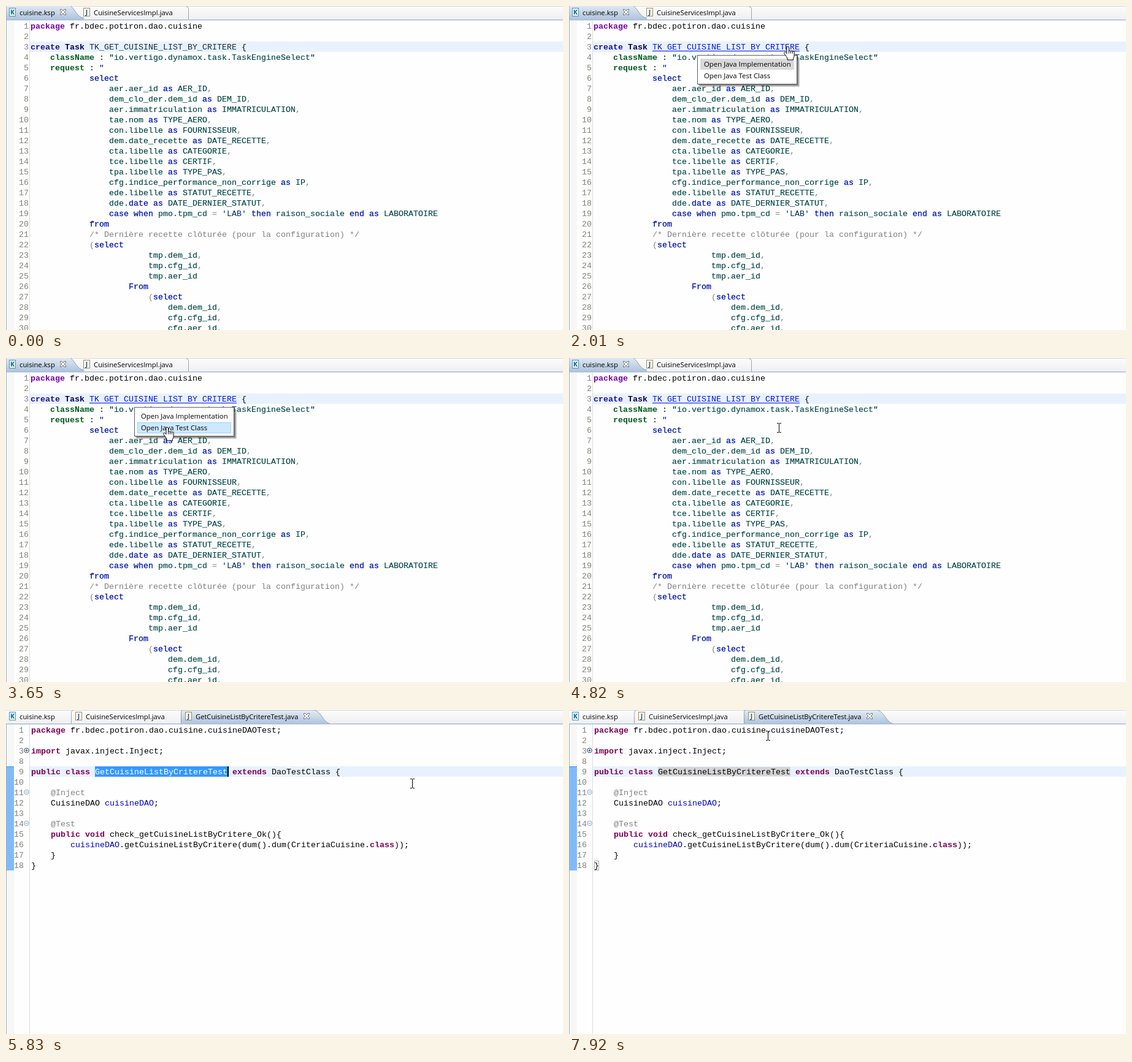
These frames come from a looping animation (908x529 px, 7.99 s). An HTML page:

```html
<!DOCTYPE html>
<html lang="fr">
<head>
<meta charset="utf-8">
<title>Editor</title>
<style>
html, body { margin: 0; width: 100%; height: 100%; overflow: hidden; background: #fff; }
svg { display: block; width: 908px; height: 529px; }
text { white-space: pre; }
.code text { font: 13.333px "Liberation Mono", "Courier New", monospace; }
.ui { font: 11.3px "Open Sans", "Noto Sans", sans-serif; fill: #000; }
.num { fill: #85827a; text-anchor: end; }
.kw { fill: #7f0055; font-weight: bold; }
.pkg { fill: #7a00a8; font-weight: bold; }
.make { fill: #1a0f9c; font-weight: bold; }
.def { fill: #00005f; font-weight: bold; }
.prop { fill: #005a1e; font-weight: bold; }
.sql { fill: #0016b0; stroke: #0016b0; stroke-width: .3px; }
.id { fill: #004444; stroke: #004444; stroke-width: .15px; }
.str { fill: #002a5c; }
.dim { fill: #808080; }
.field { fill: #0000c0; }
.link { fill: #0018d8; }
.sel { fill: #fff; }
.name { fill: #10303c; }
</style>
</head>
<body>
<svg viewBox="0 0 908 529" xmlns="http://www.w3.org/2000/svg">
  <defs>
    <linearGradient id="bar" x2="0" y2="1"><stop stop-color="#fcfcfc"/><stop offset="1" stop-color="#efefef"/></linearGradient>
    <linearGradient id="tab" x2="0" y2="1"><stop stop-color="#e6edf5"/><stop offset="1" stop-color="#adc2db"/></linearGradient>
    <pattern id="hatch" width="2" height="2" patternUnits="userSpaceOnUse">
      <rect width="2" height="2" fill="#b8d8fa"/><path d="M0 0h1v1H0zM1 1h1v1H1z" fill="#4a9cf5"/>
    </pattern>
    <g id="close"><path d="M-4.5-4.5h2.2L0-2 2.3-4.5h2.2v2L2 0l2.5 2.5v2H2.3L0 2l-2.3 2.5h-2.2v-2L-2 0l-2.5-2.5z" fill="#fff" stroke="#62686f"/></g>
    <g id="ibeam" shape-rendering="crispEdges"><path d="M-3-8h3v1h1v-1h3v1H1v14h3v1H1v-1H0v1h-3v-1h3V-7h-3z"/></g>
    <g id="hand" stroke="#000" stroke-linejoin="round">
      <path d="M.5.5C-.6.5-1 1.2-1 2v9.5l-1.7-1.7c-1.4-1.2-3.3 0-2.5 1.7l3.7 5.2 1.5 2.8v2.5h9.5v-2.5c1.3-2 1.7-3.5 1.7-6.5V9.2c0-1.8-2.3-2-2.8-.7-.3-1.6-2.5-1.7-2.9-.6-.5-1.4-2.4-1.4-2.9-.4V2C2.6 1.2 1.8.5.5.5z" fill="#fff"/>
      <path d="M2.6 7v4.5M5.5 8v3.5M8.4 8.5v3" fill="none"/>
    </g>
  </defs>
  <rect width="908" height="529" fill="#fefefe"/>
  <g id="ksp"></g>
  <g id="java"></g>
  <g id="menu"></g>
  <use id="beamCur" href="#ibeam"/>
  <use id="handCur" href="#hand"/>
</svg>
<script>
const LOOP = 7990;
const $ = id => document.getElementById(id);
const esc = s => s.replace(/&/g, "&amp;").replace(/</g, "&lt;");
const span = (cls, s) => `<tspan class="${cls}">${esc(s)}</tspan>`;
const rect = (x, y, w, h, fill, more = "") => `<rect x="${x}" y="${y}" width="${w}" height="${h}" fill="${fill}" ${more}/>`;
const path = (d, more) => `<path d="${d}" ${more}/>`;
const label = (x, y, s, size = 11.3) => `<text class="ui" x="${x}" y="${y}" style="font-size:${size}px">${s}</text>`;
const row = i => 37 + 17 * i;

// Wraps every match of the rules [class, pattern] in a coloured span
function paint(s, rules, rest) {
  const re = new RegExp(rules.map(r => `(${r[1]})`).join("|"), "g");
  let out = "", at = 0;
  for (const m of s.matchAll(re)) {
    if (m.index > at) out += span(rest, s.slice(at, m.index));
    out += span(rules[m.slice(1).findIndex(g => g !== undefined)][0], m[0]);
    at = m.index + m[0].length;
  }
  return out + (at < s.length ? span(rest, s.slice(at)) : "");
}

function icon(x, letter) {
  const k = letter === "K";
  return rect(x + .5, 3.5, 10, 13, k ? "#f2fafd" : "#fffdf2", `stroke="${k ? "#4f8fb0" : "#a08a50"}"`) +
    `<text x="${x + 5.5}" y="14" text-anchor="middle" style="font:bold 10.5px 'Open Sans',sans-serif" fill="${k ? "#00698c" : "#22559c"}">${letter}</text>`;
}

// Tab strip with the active tab from x0 whose curve starts at x1
function strip(x0, x1, edge) {
  const shape = `M${x0} 23V${x0 ? 3 : 0}q0-3 ${x0 ? 3 : 0}-3H${x1}c7 0 11 5 16 12 5 7 8 10 14 10.5`;
  return rect(0, 0, 908, 23, "url(#bar)") + rect(0, 0, 908, 1, "#d5d8dc") +
    path(edge, 'fill="none" stroke="#a3a6aa"') +
    path(shape + "V23z", 'fill="url(#tab)"') + path(shape, 'fill="none" stroke="#8d9db2"') +
    rect(0, 22, 908, 1, "#a5bcd8") + rect(0, 23, 908, 1, "#d3dfec") + rect(0, 23, 1, 506, "#99b4d1");
}

const kspCode = `package fr.bdec.potiron.dao.cuisine

create Task TK_GET_CUISINE_LIST_BY_CRITERE {
    className : "io.vertigo.dynamox.task.TaskEngineSelect"
    request : "
            select
                aer.aer_id as AER_ID,
                dem_clo_der.dem_id as DEM_ID,
                aer.immatriculation as IMMATRICULATION,
                tae.nom as TYPE_AERO,
                con.libelle as FOURNISSEUR,
                dem.date_recette as DATE_RECETTE,
                cta.libelle as CATEGORIE,
                tce.libelle as CERTIF,
                tpa.libelle as TYPE_PAS,
                cfg.indice_performance_non_corrige as IP,
                ede.libelle as STATUT_RECETTE,
                dde.date as DATE_DERNIER_STATUT,
                case when pmo.tpm_cd = 'LAB' then raison_sociale end as LABORATOIRE
            from
            /* Dernière recette clôturée (pour la configuration) */
            (select
                        tmp.dem_id,
                        tmp.cfg_id,
                        tmp.aer_id
                    From
                        (select
                            dem.dem_id,
                            cfg.cfg_id,
                            cfg.aer_id,`.split("\n");

const headRules = [["pkg", "^package"], ["make", "create"], ["def", "\\bTask\\b(?= TK)"], ["name", "TK_\\w+"],
  ["prop", "className|request"], ["id", "\"io[^\"]*\""], ["str", "\""]];
const sqlRules = [["dim", "/\\*.*\\*/|[,(=]"], ["str", "'LAB'"],
  ["sql", "\\b(?:select|as|[fF]rom|case|when|then|end|date)\\b"]];

function buildKsp() {
  let g = strip(0, 97, "M120 22.5H297.5V5q0-4-4-4.5");
  g += icon(5, "K") + label(22, 15, "cuisine.ksp") + '<use href="#close" x="93" y="10"/>';
  g += icon(126, "J") + label(143, 15, "CuisineServicesImpl.java");
  g += rect(1, 24, 12, 505, "#f7f7f7") + rect(38, 24, 1, 505, "#dcdcdc") + rect(39, 58, 869, 17, "#e8f2fe");
  g += '<g class="code">';
  kspCode.forEach((s, i) => {
    g += `<text class="num" x="37" y="${row(i)}">${i + 1}</text>`;
    g += `<text x="40" y="${row(i)}">${i < 5 ? paint(s, headRules, "") : paint(s, sqlRules, "id")}</text>`;
  });
  // The underline swallows the underscores of the link
  g += `<g id="link">${rect(136, 59, 240, 16, "#e8f2fe")}<text class="link" x="136" y="71">TK GET CUISINE LIST BY CRITERE</text>${rect(136, 73, 240, 1, "#0018d8")}</g>`;
  $("ksp").innerHTML = g + "</g>";
}

const javaCode = `1|package fr.bdec.potiron.dao.cuisine.cuisineDAOTest;
2|
3|import javax.inject.Inject;
8|
9|public class GetCuisineListByCritereTest extends DaoTestClass {
10|
11|    @Inject
12|    CuisineDAO cuisineDAO;
13|
14|    @Test
15|    public void check_getCuisineListByCritere_Ok(){
16|        cuisineDAO.getCuisineListByCritere(dum().dum(CriteriaCuisine.class));
17|    }
18|}`.split("\n").map(s => s.split("|"));

const javaRules = [["kw", "\\b(?:package|import|public|class|extends|void)\\b"],
  ["dim", "@\\w+"], ["field", "\\bcuisineDAO\\b"]];

function fold(y, plus) {
  const c = plus ? "#33465c" : "#8fa6c0";
  return `<circle cx="33.5" cy="${y}" r="3.8" fill="#f4f8fc" stroke="${c}"/>` +
    path(`M31.5 ${y}h4${plus ? `M33.5 ${y - 2}v4` : ""}`, `stroke="${c}"`);
}

function buildJava() {
  let g = strip(285.5, 500, "M106.5 22V4q0-3 3-3.5");
  g += icon(5, "K") + label(22, 15, "cuisine.ksp") + icon(113, "J") + label(130, 15, "CuisineServicesImpl.java");
  g += icon(292, "J") + label(309, 15, "GetCuisineListByCritereTest.java", 11.2) + '<use href="#close" x="490" y="10"/>';
  g += rect(1, 24, 12, 505, "#f7f7f7") + rect(1, 93, 12, 169, "url(#hatch)") + rect(1, 92, 12, 1, "#3399ff");
  g += rect(38, 24, 1, 505, "#dcdcdc") + rect(39, 92, 869, 17, "#e8f2fe");
  g += rect(145, 93, 216, 15, "#d4d4d4", 'id="mark"');
  g += '<g class="code">';
  javaCode.forEach(([n, s], i) => {
    g += `<text class="num" x="29" y="${row(i)}">${n}</text><text x="41" y="${row(i)}">${paint(s, javaRules, "")}</text>`;
  });
  g += `<g id="sel">${rect(145, 92, 216, 17, "#3399ff")}<text class="sel" x="145" y="${row(4)}">GetCuisineListByCritereTest</text></g></g>`;
  g += fold(66, true) + fold(134) + fold(185);
  g += rect(41.5, 246.5, 7, 15, "none", 'stroke="#a9a9a9" id="brace"');
  $("java").innerHTML = g + rect(361, 92, 2, 17, "#000", 'id="caret"');
}

function buildMenu() {
  let g = "";
  for (let i = 4; i; i--) g += rect(209 + i, 80 + i, 163, 48, "#000", 'opacity=".16" rx="1"');
  g += rect(209.5, 80.5, 162, 47, "#fff", 'stroke="#5f5f5f"') + rect(214.5, 86.5, 152, 17, "#d9d9d9", 'id="item"');
  $("menu").innerHTML = g + label(220, 99, "Open Java Implementation", 11.4) + label(220, 118, "Open Java Test Class", 11.4);
}

// Pointer moves: start, end, number of steps, points along the way
const moves = [
  [610, 1390, 11, [819, 491], [760, 390], [590, 210], [440, 92], [374, 64]],
  [1470, 1700, 4, [372, 65], [354, 64]],
  [2010, 2010, 1, [356, 66]],
  [2460, 2460, 1, [358, 68]],
  [2630, 3410, 11, [358, 71], [342, 104], [279, 112]],
  [3480, 3650, 3, [274, 112], [262, 113]],
  [3800, 4040, 4, [275, 113], [340, 114]],
  [4740, 4740, 1, [342, 114]],
  [5290, 6060, 11, [310, 128], [110, 206], [360, 214], [656, 132], [668, 108], [652, 101]],
  [6140, 6140, 1, [652, 100]],
  [6290, 6680, 6, [664, 108], [732, 166], [746, 179]],
  [7460, 7920, 7, [720, 165], [480, 85], [324, 42]]
];

function pointer(t) {
  const m = moves.filter(v => v[0] <= t).pop();
  if (!m) return null;
  const [t0, t1, n, ...pts] = m;
  if (n === 1) return pts[0];
  const k = Math.min(n - 1, Math.floor((t - t0) / (t1 - t0) * (n - 1) + .2));
  const u = k / (n - 1) * (pts.length - 1);
  const i = Math.min(pts.length - 2, Math.floor(u));
  return [0, 1].map(a => Math.round(pts[i][a] + (pts[i + 1][a] - pts[i][a]) * (u - i)));
}

const between = (t, a, b) => t >= a && t < b;
const show = (id, on) => $(id).style.display = on ? "" : "none";
const set = (id, o) => { for (const k in o) $(id).setAttribute(k, o[k]); };

function draw(t) {
  const p = pointer(t), open = between(t, 2010, 4740), java = t >= 4910, clicked = t >= 6140;
  show("ksp", !java);
  show("java", java);
  show("link", t >= 2010);
  show("menu", open);
  show("handCur", open);
  show("beamCur", p && !open);
  if (p) set(open ? "handCur" : "beamCur", { x: p[0], y: p[1] });
  if (open) {
    const hot = p[1] > 84;
    set("item", { y: p[1] > 103 ? 105.5 : 86.5, fill: hot ? "#cce8ff" : "#d9d9d9", stroke: hot ? "#99d1ff" : "#d9d9d9" });
  }
  show("sel", !clicked);
  show("mark", clicked);
  show("brace", clicked);
  set("caret", { x: clicked ? 545 : 361 });
  show("caret", between(t, 4990, 5290) || between(t, 5820, 6680) || between(t, 7230, 7770));
}

buildKsp();
buildJava();
buildMenu();
const start = performance.now();
function tick() {
  draw((performance.now() - start) % LOOP);
  requestAnimationFrame(tick);
}
tick();
</script>
</body>
</html>
```
